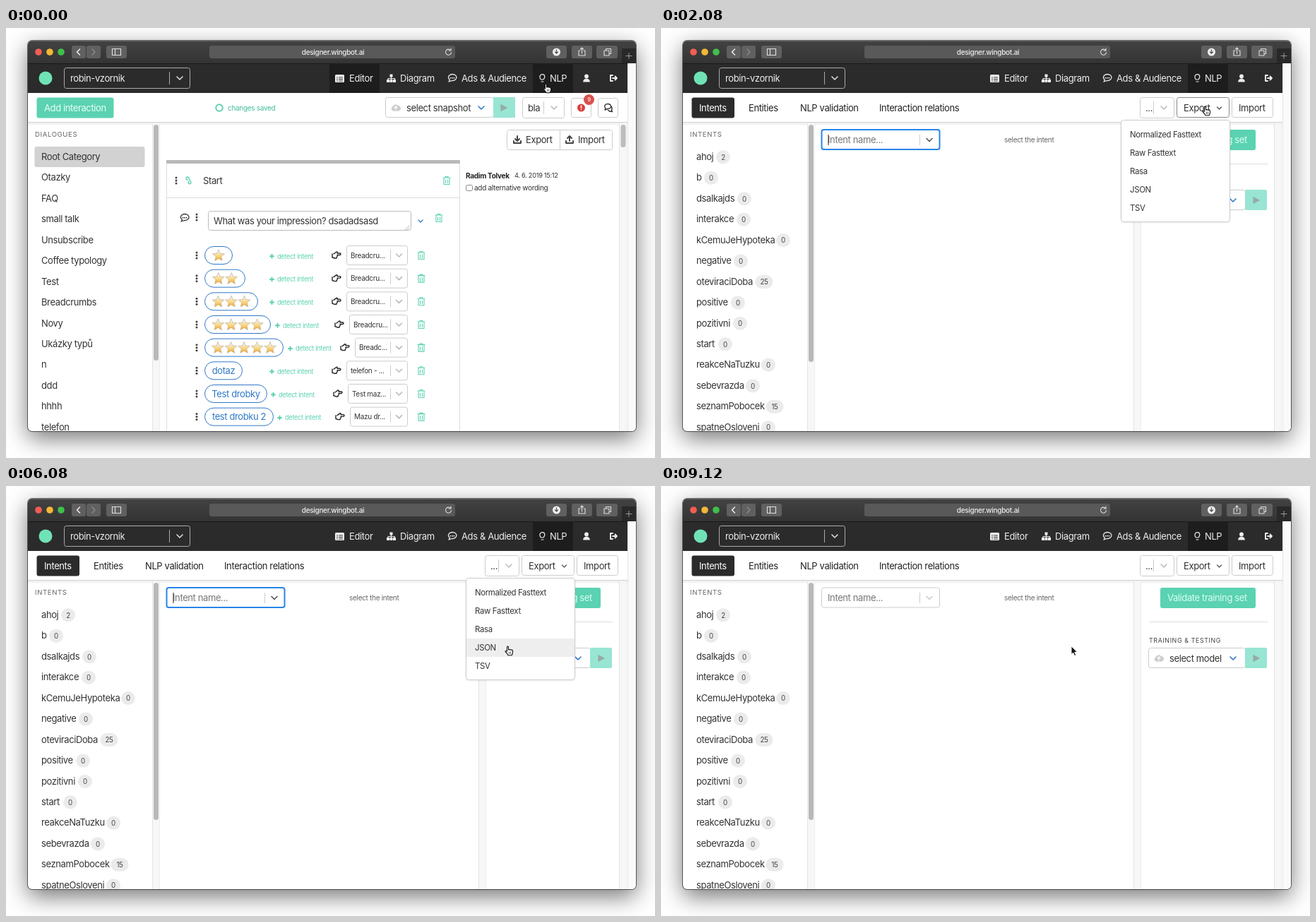
Write an HTML page that moves like this. It is 919x609 px and loops after 9.2 s.

```html
<!DOCTYPE html>
<html lang="en">
<head>
<meta charset="utf-8">
<title>Designer walkthrough</title>
<style>
  html, body { margin: 0; width: 100%; height: 100%; overflow: hidden; background: #fff; }
  .window { position: absolute; left: 31px; top: 18px; width: 861px; height: 553px; border-radius: 6px;
    background: #fff; box-shadow: 0 0 0 1px rgba(0,0,0,.55), 0 10px 33px rgba(0,0,0,.55); }
  svg { position: absolute; left: 0; top: 0; width: 919px; height: 609px; }
  text { font-family: Inter, Roboto, sans-serif; letter-spacing: -.03em; white-space: pre; }
  .caps { letter-spacing: .6px; }
  #menu { filter: drop-shadow(0 1px 1px rgba(0,0,0,.08)); }
</style>
</head>
<body>
<div class="window"></div>
<svg id="stage" viewBox="0 0 919 609"></svg>
<script>
const LOOP = 9200, STEP = 80;
const INK = '#333', DARK = '#2b2b2b', MINT = '#5bd2b1', PALE = '#98e5d3', BLUE = '#2f78c8', LINE = '#ccc';

// Drawing helpers; text is placed by its vertical centre.
const rect = (x, y, w, h, fill, r = 0, extra = '') =>
  `<rect x="${x}" y="${y}" width="${w}" height="${h}" rx="${r}" fill="${fill}" ${extra}/>`;
const box = (x, y, w, h, stroke = LINE, r = 3, fill = '#fff', extra = '') =>
  rect(x + .5, y + .5, w - 1, h - 1, fill, r, `stroke="${stroke}" ${extra}`);
const text = (x, y, s, size = 13, fill = INK, extra = '') =>
  `<text x="${x}" y="${y + size * .36}" font-size="${size}" fill="${fill}" ${extra}>${s}</text>`;
const mid = (x, y, s, size, fill) => text(x, y, s, size, fill, 'text-anchor="middle"');
const path = (d, stroke, w = 1.5, fill = 'none', extra = '') =>
  `<path d="${d}" stroke="${stroke}" stroke-width="${w}" fill="${fill}" stroke-linejoin="round" stroke-linecap="round" ${extra}/>`;
const dot = (x, y, r, fill, extra = '') => `<circle cx="${x}" cy="${y}" r="${r}" fill="${fill}" ${extra}/>`;
const group = (id, body) => `<g id="${id}">${body}</g>`;

// Icons
const chevron = (x, y, color, extra = '') => path(`M${x - 4} ${y - 2}l4 4 4-4`, color, 1.6, 'none', extra);
const smallChevron = (x, y, color) => path(`M${x - 3} ${y - 1.5}l3 3 3-3`, color, 1.3);
const grip = (x, y) => [-4, 0, 4].map(d => dot(x, y + d, 1.5, '#444')).join('');
const trash = (x, y) => path(`M${x - 5} ${y - 4}h10m-7 0v-1.5h4v1.5M${x - 4} ${y - 3}v8.5h8v-8.5m-5.5 2v4.5m3-4.5v4.5`, MINT, 1.1);
const play = (x, y) => path(`M${x - 4} ${y - 4.5}l8.5 4.5-8.5 4.5z`, '#8a9d98', .5, '#9aaaa5');
const cloud = (x, y) => path(`M${x - 4} ${y + 4}a3 3 0 0 1 0-5.5a4 4 0 0 1 7-1a3.3 3.3 0 0 1 1 6.5z`, LINE, 1, LINE) +
  path(`M${x} ${y + 3}v-5m-2 2l2-2 2 2`, '#fff', 1.2);
const bubble = (x, y, color) => path(`M${x - 5} ${y + 5}l1.5-2.5a5.8 4.5 0 1 1 3 1z`, color, 1.3) +
  [-2.5, 0, 2.5].map(d => dot(x + d, y - .3, .9, color)).join('');
const pointRight = (x, y) => path(`M${x - 6} ${y - 2}v5m2-5l4-3q2 0 1 2h4q2 1 0 2.500h-4q1 1 0 2t-1 2.500h-3l-2-1`, '#222', 1.4);
const transfer = (x, y, dir) => path(`M${x - 5} ${y + 2}v3h10v-3`, '#444', 2) +
  path(`M${x} ${y - 5}v7m-3 ${dir > 0 ? -3 : -4}l3 ${3 * dir} 3 ${-3 * dir}`, '#444', 2);
const star = (x, y) => {
  const points = Array.from({ length: 10 }, (_, i) => {
    const a = i * Math.PI / 5, r = i % 2 ? 4 : 8.8;
    return `${x + r * Math.sin(a)},${y + .5 - r * Math.cos(a)}`;
  });
  return `<polygon points="${points.join(' ')}" fill="url(#gold)" stroke="#b9a78c" stroke-width=".6"/>`;
};
const select = (x, y, w, h, label, size = 13, pad = 8, tail = 30) => box(x, y, w, h) +
  text(x + pad, y + h / 2, label, size) + rect(x + w - tail, y + 6, 1, h - 12, LINE) +
  chevron(x + w - tail / 2, y + h / 2, '#bbb');

function chrome() {
  const button = (x, w, fill = '#606060') => rect(x, 25, w, 18, fill, 3);
  return rect(31, 18, 861, 32, 'url(#title)') + rect(31, 18, 861, 1, '#686868') +
    ['#f45d54', '#f3b836', '#40c04b'].map((c, i) => dot(46 + 16 * i, 34, 4.8, c)).join('') +
    button(93, 20) + button(114, 20) + button(142, 29) + button(288, 348, '#595959') +
    button(765, 29) + button(801, 29) + button(836, 30) +
    path('M104.5 30l-4 4 4 4', '#eee') + path('M122 30l4 4-4 4', '#888') +
    path('M150.5 29.5h12v9h-12zM154.5 29.5v9', '#ddd', 1.2) +
    text(463, 34.2, 'designer.wingbot.ai', 10, '#eee', 'text-anchor="middle" font-weight="500"') +
    path('M629.5 31.5a4 4 0 1 0 1 3M630 29v3h-3', '#ddd', 1.1) +
    dot(779.5, 34, 5.5, '#eee') + path('M779.5 31v5m-2-2l2 2 2-2', '#555', 1.3) +
    path('M813 32h-2v7h9v-7h-2M815.5 36v-8m-2 2l2-2 2 2', '#ddd', 1.1) +
    path('M847 32h7v7h-7zM849.5 32v-2.5h7v7h-2.5', '#ddd', 1.1) +
    rect(872, 29, 20, 21, '#292929') + path('M878 39.5h8m-4-4v8', '#999', 1) +
    rect(880, 50, 12, 521, '#fafafa') + rect(880, 50, 1, 521, '#e5e5e5') +
    rect(31, 50, 849, 42, DARK) + rect(31, 50, 849, 1, '#191919');
}

function header() {
  return rect(746, 50, 57, 42, '#1d1d1d') + dot(56, 71, 9.5, '#70e3b6') +
    box(82, 56, 179, 30, '#aaa', 3, DARK) + text(91, 71, 'robin-vzornik', 13, '#eee') +
    rect(231, 62, 1, 18, '#aaa') + chevron(246, 71, '#ddd') +
    rect(466, 66, 13, 11, '#eee', 1.5) + path('M468.5 70h1m2 0h5m-8 2.500h1m2 0h5m-8 2.500h1m2 0h5', DARK, 1) +
    text(486, 71, 'Editor', 13, '#eee') +
    rect(543.5, 65.5, 4, 4, '#eee') + path('M545.5 69v4M541 74v-2.5h9.5v2.5', '#eee', 1.1) +
    [539, 543.5, 548].map(x => rect(x, 73, 4, 4, '#eee')).join('') + text(558, 71, 'Diagram', 13, '#eee') +
    bubble(632, 71, '#eee') + text(645, 71, 'Ads &amp; Audience', 13, '#eee') +
    path('M757.5 73q-2-2-1.5-4a3.4 3.4 0 0 1 6.8 0q0 2-1.8 4zM758 76h3', '#eee', 1.2) +
    text(770, 71, 'NLP', 13, '#eee') +
    dot(822, 68.5, 2.9, '#eee') + path('M817.5 76q0-4 4.5-4t4.5 4z', '#eee', .5, '#eee') +
    path('M859 67h-3v8h3M859 71h6m-2.5-2.5l2.5 2.5-2.5 2.5', '#eee', 1.9);
}

const gutter = x => rect(x, 135, 11, 436, '#f7f7f7') + rect(x, 135, 1, 436, '#e4e4e4') + rect(x + 10, 135, 1, 436, '#eee');
const itemY = i => 182.3 + 29.45 * i;
const toolbarShadow = () => rect(31, 133, 849, 1.5, '#d4d4d4') + rect(31, 134.5, 849, 3, '#f3f3f3');

function editorPage() {
  const dialogues = ['Root Category', 'Otazky', 'FAQ', 'small talk', 'Unsubscribe', 'Coffee typology', 'Test',
    'Breadcrumbs', 'Novy', 'Ukázky typů', 'n', 'ddd', 'hhhh', 'telefon'];
  // pill right edge, intent x, select x, select label, pill label or star count
  const replies = [
    [321, 373, 482, 'Breadcru...', 1], [339, 373, 482, 'Breadcru...', 2], [357, 373, 482, 'Breadcru...', 3],
    [375, 381, 486, 'Breadcru...', 4], [393, 399, 494, 'Breadc...', 5], [335, 373, 482, 'telefon - ...', 'dotaz'],
    [370, 375, 484, 'Test maz...', 'Test drobky'], [379, 384, 487, 'Mazu dr...', 'test drobku 2']];
  const reply = ([right, intentX, selectX, target, label], i) => {
    const y = 322 + 32.66 * i, centre = (281 + right) / 2;
    const face = typeof label === 'string' ? mid(centre, y, label, 13, BLUE) :
      Array.from({ length: label }, (_, k) => star(centre + 18.5 * (k - (label - 1) / 2), y)).join('');
    return grip(270, y) + box(281, y - 13, right - 281, 26, BLUE, 12.5) + face +
      path(`M${intentX + 1} ${y + 1.3}h5m-2.5-2.5v5`, MINT, 2) + text(intentX + 11, y + 1.3, 'detect intent', 9.2, MINT) +
      pointRight(selectX - 14, y) + select(selectX, y - 14, 569 - selectX, 28, target, 10, 6, 25) + trash(588, y);
  };
  return rect(458, 50, 71, 42, '#1d1d1d') +
    rect(43.5, 98.5, 109, 29, MINT, 3) + text(54, 113, 'Add interaction', 13, '#e9fff8') +
    dot(302, 113, 4.7, 'none', `stroke="${MINT}" stroke-width="2"`) + text(314, 113, 'changes saved', 10, '#43bd9b') +
    box(537, 98, 154, 29) + cloud(552, 113) + text(567, 113, 'select snapshot') + chevron(673, 113, BLUE) +
    rect(690, 98, 31, 29, PALE) + play(705, 113) + select(731, 98, 60, 30, 'bla') +
    box(800, 99, 29, 28) + dot(814.5, 113, 5.5, '#d9403f') + path('M814.5 110v3.2m0 2.300v.1', '#fff', 1.6) +
    dot(825.5, 101.5, 7.5, '#d9504c') + mid(825.5, 101.5, '9', 8, '#fff') +
    box(838, 99, 29, 28) + path('M848 116l1-2.5a4.5 3.5 0 1 1 3 1zM857 111q2 2 .5 5l1 2.5q-4 0-6-2', '#333', 1.4) +
    toolbarShadow() +
    text(41, 151, 'DIALOGUES', 9.6, '#666', 'class="caps"') + rect(40.5, 168, 156, 29, '#d2d2d2', 3) +
    dialogues.map((s, i) => text(50, itemY(i), s)).join('') +
    gutter(207) + rect(209, 137, 7, 334, '#b9b9b9', 3.5) +
    gutter(868) + rect(870.5, 137, 7, 32, '#bdbdbd', 3.5) +
    box(709, 144, 150, 29) + rect(784, 144, 1, 29, LINE) +
    transfer(724, 158, 1) + text(736, 158.5, 'Export') + transfer(798, 158, -1) + text(810, 158.5, 'Import') +
    box(227, 187, 416, 390, '#ddd', 2) + rect(227, 187, 416, 5, '#b9b9b9', 1) + rect(227, 240, 415, 1, '#ddd') +
    grip(241, 216) + path('M257 215a2 2 0 1 1 2-2l2 4a2 2 0 1 1-2 0', MINT, 1.4) + text(279, 216, 'Start') + trash(624, 216) +
    bubble(253, 269, '#333') + grip(270, 268) + box(286, 259, 288, 28, '#bbb') +
    text(294, 273, 'What was your impression? dsadadsasd') + path('M571 280l-6 6m6-3l-3 3', '#999', .7) +
    smallChevron(587, 273.5, BLUE) + trash(613, 269) + replies.map(reply).join('') +
    text(651, 209, 'Radim Tolvek', 10, '#222', 'font-weight="700"') + text(720, 209, '4. 6. 2019 15:12', 9.2) +
    box(651, 222, 10, 9, '#888', 2) + text(663, 226, 'add alternative wording', 10);
}

function intentsPage() {
  // name, badge centre, count
  const intents = [['ahoj', 88, 2], ['b', 71, 0], ['dsalkajds', 118, 0], ['interakce', 117, 0],
    ['kCemuJeHypoteka', 173, 0], ['negative', 113, 0], ['oteviraciDoba', 146, 25], ['positive', 109, 0],
    ['pozitivni', 112, 0], ['start', 91, 0], ['reakceNaTuzku', 152, 0], ['sebevrazda', 130, 0],
    ['seznamPobocek', 161, 15], ['spatneOsloveni', 152, 0]];
  const intent = ([name, x, count], i) => {
    const y = itemY(i), w = count > 9 ? 25 : 20;
    return text(50, y, name) + rect(x - w / 2, y - 9, w, 19, '#ebebeb', 9.5) + mid(x, y + .8, count, 9.8, '#444');
  };
  return rect(43.5, 98.5, 60.5, 29, DARK, 3) + text(54, 113, 'Intents', 13, '#fff') + text(124, 113, 'Entities', 13, '#222') +
    text(197, 113, 'NLP validation', 13, '#222') + text(309, 113, 'Interaction relations', 13, '#222') +
    select(678, 98, 49, 30, '...') +
    box(730, 98, 75, 29, LINE, 3, '#fff', 'id="exportBox"') + text(740, 113, 'Export') + smallChevron(790.5, 113.5, '#555') +
    box(808, 98, 59, 29) + text(818, 113, 'Import') + toolbarShadow() +
    text(41, 151, 'INTENTS', 9.6, '#666', 'class="caps"') + intents.map(intent).join('') +
    gutter(207) + rect(209, 137, 7, 336, '#b9b9b9', 3.5) + gutter(669) + gutter(868) +
    box(227, 143.5, 168, 29, LINE, 3, '#fff', 'id="intentBox"') + text(236, 158.5, 'Intent name...', 13, '#777') +
    rect(366, 151, 1, 15, LINE) + chevron(380, 158.5, LINE, 'id="intentChevron"') +
    rect(236.5, 151, 1, 15, '#222', 0, 'id="caret"') + text(486, 158, 'select the intent', 10, '#666') +
    rect(707, 144, 135, 29, MINT, 3) + text(717, 158.5, 'Validate training set', 13, '#d8fff3') +
    rect(691, 192, 168, 1, '#ddd') + text(691, 219, 'TRAINING &amp; TESTING', 8.9, '#444', 'class="caps"') +
    box(690, 229, 138, 29, LINE, 3, '#fff', 'id="model"') + cloud(705, 244) + text(720, 244, 'select model') +
    chevron(810, 244, BLUE, 'id="modelChevron"') +
    path('M812 239.5a4.8 4.8 0 0 0 0 9', '#bbb', 1, 'none', 'id="spinner"') +
    rect(827, 229, 31, 29, PALE, 2) + play(843, 244);
}

const formats = ['Normalized Fasttext', 'Raw Fasttext', 'Rasa', 'JSON', 'TSV'];
const formatY = i => 150.5 + 26.2 * i;

document.getElementById('stage').innerHTML = `
  <defs>
    <linearGradient id="title" x2="0" y2="1"><stop stop-color="#424242"/><stop offset="1" stop-color="#343434"/></linearGradient>
    <linearGradient id="gold" x2="0" y2="1"><stop offset=".2" stop-color="#f3eee4"/><stop offset=".6" stop-color="#f9d57b"/><stop offset="1" stop-color="#ef9f26"/></linearGradient>
    <clipPath id="frame"><rect x="31" y="18" width="861" height="553" rx="6"/></clipPath>
  </defs>
  <g clip-path="url(#frame)">${chrome()}${group('editor', editorPage())}${group('intents', intentsPage())}${header()}</g>` +
  group('menu', box(651, 130, 155, 145, LINE, 4) + rect(652, 0, 153, 26, '#eee', 0, 'id="highlight"') +
    formats.map((s, i) => text(664, formatY(i), s, 11.4)).join('')) +
  dot(0, 0, 30, '#999', 'id="download"') +
  group('cursor',
    group('arrow', path('M0 0v11.5l2.7-2.3 1.9 4.3 2.1-.9-1.9-4.2h3.6z', '#fff', 1, '#111')) +
    group('hand', path('M-.5 1q1-1.7 2 0v4q1-1 2 0q1-.8 2 .3q1.6-.5 2 1v2.5q0 2-1.5 4h-5q-1-2.5-4-5.3q0-1.8 2.5-.3z', '#111', 1.1, '#fff') +
      path('M2.5 8v2.5m2-2.5v2.5', '#111', .7)));

const el = id => document.getElementById(id);
const show = (id, on) => el(id).setAttribute('display', on ? 'inline' : 'none');
const set = (id, name, value) => el(id).setAttribute(name, value);

const PAGE = 760, LOADED = 1120, MENU = 2000, BLUR = 6560, CLOSE = 8400, FLIGHT = 720;
// time, x, y
const route = [[0, 764, 79], [560, 785, 67], [1120, 785, 67], [1840, 770, 111], [2560, 770, 111],
  [3280, 768, 116], [5120, 768, 116], [5760, 710, 227], [7520, 710, 227], [8000, 581, 227], [LOOP, 581, 227]];

function cursorAt(t) {
  const i = route.findIndex(([end]) => t < end);
  const [t0, x0, y0] = route[i - 1], [t1, x1, y1] = route[i];
  const p = (t - t0) / (t1 - t0), ease = p * p * (3 - 2 * p);
  return [x0 + (x1 - x0) * ease, y0 + (y1 - y0) * ease];
}

function draw(t) {
  const [x, y] = cursorAt(t), focused = t >= PAGE && t < BLUR, loading = t < LOADED;
  show('editor', t < PAGE);
  show('intents', t >= PAGE);

  const overExport = x > 730 && x < 805 && y > 98 && y < 127;
  set('exportBox', 'stroke', overExport ? '#888' : LINE);
  set('intentBox', 'stroke', focused ? '#2684e8' : LINE);
  set('intentBox', 'stroke-width', focused ? 2 : 1);
  set('intentChevron', 'stroke', !focused ? LINE : t < 960 ? '#999' : '#555');
  show('caret', focused && Math.floor((t - PAGE) / 500) % 2 === 0);
  set('model', 'fill', loading ? '#eee' : '#fff');
  show('modelChevron', !loading);
  show('spinner', loading);
  set('spinner', 'transform', `rotate(${(t - 880) * .36} 812 244)`);

  const row = Math.round((y - formatY(0)) / 26.2);
  show('menu', t >= MENU && t < CLOSE);
  show('highlight', x > 652 && x < 805 && y > 137.5 && row < formats.length);
  set('highlight', 'y', formatY(row) - 13);

  // The download curves up into the toolbar, shrinking on the way.
  const p = (t - BLUR) / FLIGHT, q = 1 - p;
  show('download', p > 0 && p < 1);
  set('download', 'cx', q * q * 461 + 2 * p * q * 625 + p * p * 779);
  set('download', 'cy', q * q * 300 + 2 * p * q * 38 + p * p * 34);
  set('download', 'r', Math.max(0, 30 * Math.min(1, p * 4, 1.6 - 1.35 * p)));

  const hand = t < PAGE || (t >= 1680 && t < BLUR);
  show('hand', hand);
  show('arrow', !hand);
  set('cursor', 'transform', `translate(${x} ${y})`);
}

const start = performance.now();
function tick() {
  const t = (performance.now() - start) % LOOP;
  draw(Math.floor(t / STEP) * STEP);
  requestAnimationFrame(tick);
}
tick();
</script>
</body>
</html>
```
